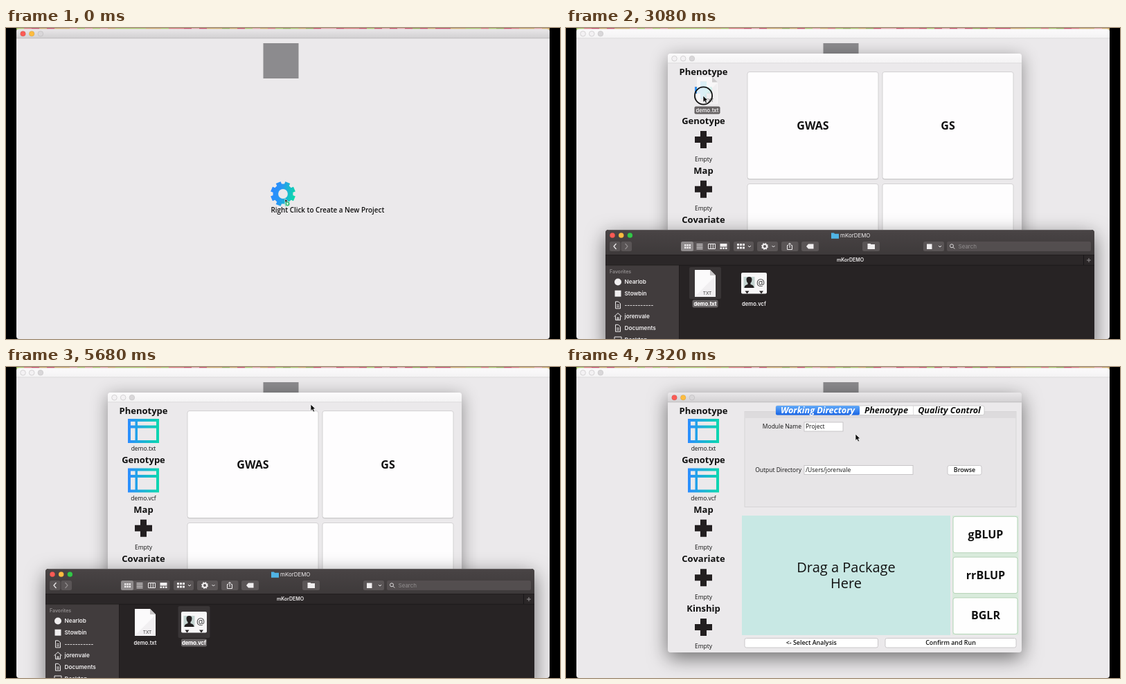
An HTML page that plays this animation: 800 px wide and 450 px high, repeating every 7.36 s.

```html
<!DOCTYPE html>
<html lang="en">
<head>
<meta charset="utf-8">
<title>Project setup demo</title>
<style>
html, body { margin: 0; width: 100%; height: 100%; overflow: hidden; background: #000; }
svg { display: block; width: 800px; height: 450px; }
text { font-family: "Open Sans", "Noto Sans", sans-serif; fill: #111; white-space: pre; }
.b { font-weight: 700; }
.m { font-weight: 600; }
.i { font-style: italic; }
.light { fill: #fff; }
.win { --bar: #fbfafb; --fall: .03; --line: #d4d2d4; --r: #f3f1f3; --y: #f3f1f3; --rim: #c6c4c6; }
.win.on { --bar: #e9e7e9; --fall: .1; --line: #b5b3b5; --r: #fb5b55; --y: #fdbc40; --rim: #0002; }
.shade { filter: drop-shadow(0 5px 12px #0006); }
.on > .shade { filter: drop-shadow(0 8px 14px #0008); }
.fin { --bar: #383434; --fall: .08; --tab: #302c2d; --side: #322f2f; --btn: #423e3f; --lit: #555152;
  --ink: #aaa7a8; --dim: #777475; --folder: #8d8a8b; --r: #4b4748; --y: #4b4748; --g: #4b4748; --rim: #777475; }
.fin.on { --bar: #494445; --fall: .16; --tab: #2b2728; --side: #413c3d; --btn: #5a5556; --lit: #8f8b8c;
  --ink: #f0eeef; --dim: #918d8e; --folder: #50b4e5; --r: #fb5b55; --y: #fdbc40; --g: #33c748; --rim: #0002; }
.bar { fill: var(--bar); }
.fall { fill: url(#fall); opacity: var(--fall); }
.fin text { font-family: Inter, Roboto, sans-serif; fill: var(--ink); }
.fin .dim { fill: var(--dim); }
.fin .file text, .drag text { font-family: Inter, Roboto, sans-serif; fill: #f5f3f4; }
.fin .file .ink, .drag .ink { fill: #444; }
.ln { fill: none; stroke: var(--ink); }
</style>
</head>
<body>
<svg id="stage" viewBox="0 0 800 450"></svg>
<script>
const LOOP = 7360, STEP = 40;
const BG = '#ebe9eb';

const rect = (x, y, w, h, fill, extra = '') =>
  `<rect x="${x}" y="${y}" width="${w}" height="${h}" fill="${fill}" ${extra}/>`;
const circle = (x, y, r, fill, extra = '') => `<circle cx="${x}" cy="${y}" r="${r}" fill="${fill}" ${extra}/>`;
const path = (d, extra) => `<path d="${d}" ${extra}/>`;
const group = (id, body, extra = '') => `<g id="${id}" ${extra}>${body}</g>`;
// y is the middle of the capitals
const text = (x, y, s, size, cls = '', anchor = 'middle') =>
  `<text x="${x}" y="${y + size * 0.35}" font-size="${size}" class="${cls}" text-anchor="${anchor}">${s}</text>`;

const dots = (x, y, last) => [['var(--r)', 0], ['var(--y)', 12.7], [last, 25.4]]
  .map(([c, dx]) => circle(x + dx, y, 3.8, c, 'stroke="var(--rim)" stroke-width=".7"')).join('');

// Bar with round top corners; a dark overlay deepens it towards the bottom
function bar(x, y, w, h) {
  const d = `M${x} ${y + h}V${y + 4}q0-4 4-4H${x + w - 4}q4 0 4 4V${y + h}Z`;
  return path(d, 'class="bar"') + path(d, 'class="fall"');
}
const titleBar = (x, y, w, h) => bar(x, y, w, h) + rect(x, y + h - 0.5, w, 0.7, 'var(--line)');

const defs = `<defs>
  <linearGradient id="tint"><stop stop-color="#2c8dff"/><stop offset="1" stop-color="#0bd8ae"/></linearGradient>
  <linearGradient id="gearTint" gradientUnits="userSpaceOnUse" x1="-16" y1="-4" x2="17" y2="4">
    <stop stop-color="#2b8bff"/><stop offset=".35" stop-color="#2795f5"/><stop offset="1" stop-color="#0cdca8"/></linearGradient>
  <linearGradient id="tab" x2="0" y2="1"><stop stop-color="#64abf8"/><stop offset="1" stop-color="#1764e6"/></linearGradient>
  <linearGradient id="fall" x2="0" y2="1"><stop stop-opacity="0"/><stop offset="1"/></linearGradient>
  <clipPath id="pane"><rect x="250" y="51" width="408" height="361"/></clipPath>
</defs>`;

function wallpaper() {
  const tones = ['#a9c56c', '#d7787c', '#c9a86a', '#c34f66', '#8fa655', '#e0a3a6'];
  let seed = 7, out = '';
  for (let x = 15; x < 785; x += 11) {
    seed = (seed * 73 + 41) % 997;
    out += rect(x, 0, 11, 3, tones[seed % tones.length]);
  }
  return out;
}

function gear() {
  let teeth = '';
  for (let k = 0; k < 8; k++) {
    const a = (k + 0.5) * Math.PI / 4, c = Math.cos(a), s = Math.sin(a);
    teeth += `M${c * 12} ${s * 12}L${c * 17.8} ${s * 17.8}`;
  }
  return circle(0, 0, 10.7, 'none', 'stroke="url(#gearTint)" stroke-width="7.6"') +
    path(teeth, 'stroke="url(#gearTint)" stroke-width="7.4"');
}

const mainWindow = group('main',
  rect(15, 1.5, 770, 448.5, BG, 'rx="4"') + titleBar(15, 1.5, 770, 13.5) +
  dots(24.5, 8.3, '#d9d7d9') +
  rect(371.5, 22, 51, 51, '#8c8b8e') +
  `<g transform="translate(400 240)">${gear()}</g>` +
  text(382.5, 264, 'Right Click to Create a New Project', 9.87, 'm', 'start'), 'class="win"');

const plus = (y, fill) => path(`M194 ${y - 12.5}h9v8h8v9h-8v8h-9v-8h-8v-9h8Z`, `fill="${fill}"`);
const tableIcon = y =>
  path(`M176 ${y - 17.5}h45v35h-45ZM180 ${y - 13.5}v5.5h6.5v-5.5ZM190 ${y - 13.5}v5.5h27v-5.5ZM180 ${y - 4}v17.5h6.5v-17.5ZM190 ${y - 4}v17.5h27v-17.5Z`,
    'fill="url(#tint)" fill-rule="evenodd"');

const slots = ['Phenotype', 'Genotype', 'Map', 'Covariate', 'Kinship'].map((name, k) => {
  const y = 63 + k * 71.6, file = ['demo.txt', 'demo.vcf'][k];
  let s = text(198.5, y, name, 13, 'b') +
    group('empty' + k, plus(y + 27, '#231f20') + text(198.5, y + 55, 'Empty', 8.5));
  if (file) {
    s += group('hover' + k, plus(y + 27, 'url(#tint)')) +
      group('full' + k, tableIcon(y + 29.5) + text(198.5, y + 55, file, 8.5));
  }
  return s;
}).join('');

const card = (x, y, w, h, label) =>
  rect(x, y + 0.8, w, h, '#b9b7b9', 'rx="3"') +
  rect(x, y, w, h, '#fefdfe', 'rx="3" stroke="#cbc9cb" stroke-width=".8"') +
  text(x + w / 2, y + h / 2, label, 16, 'b');
const button = (x, y, w, label) =>
  rect(x, y + 0.5, w, 13.5, '#fff', 'rx="2.5" stroke="#bfbdbf" stroke-width=".8"') +
  text(x + w / 2, y + 7, label, 8.9, 'm');
const field = (x, y, w, label, value) =>
  text(x - 4, y + 6.5, label, 8.5, '', 'end') +
  rect(x, y, w, 13, '#fff', 'stroke="#bdbbbd" stroke-width=".8"') +
  text(x + 2, y + 6.5, value, 8.5, '', 'start');
const tabLabel = (x, label, cls = '') => text(x, 62.5, label, 12.6, 'b i ' + cls);

const menu = card(262, 63.5, 189, 155, 'GWAS') + card(457, 63.5, 189, 155, 'GS') +
  rect(457, 63.5, 189, 155.5, 'none', 'id="focus" rx="3" stroke="#78aeea" stroke-width="2"') +
  card(262, 225.5, 189, 175, 'BSA') + card(457, 225.5, 189, 175, 'Converter');

const setup = `<g transform="translate(408 0)">` +
  rect(258, 64.5, 392, 138, '#e7e5e7', 'stroke="#d3d1d3" stroke-width=".8"') +
  rect(258, 65, 392, 9, '#dddbdd') +
  rect(303, 56, 301, 13.5, '#fff', 'rx="2.5" stroke="#c5c3c5" stroke-width=".8"') +
  rect(303, 56, 121, 13.5, 'url(#tab)', 'rx="2"') + rect(501, 56, 0.7, 13.5, '#d0ced0') +
  tabLabel(363.5, 'Working Directory', 'light') + tabLabel(462.5, 'Phenotype') + tabLabel(553.5, 'Quality Control') +
  field(344, 80, 56, 'Module Name', 'Project') +
  field(344, 142.5, 157, 'Output Directory', '/Users/jorenvale') +
  button(551, 142, 49, 'Browse') +
  rect(254, 215, 301, 173, '#c8e8e4') +
  text(404.5, 290, 'Drag a Package', 20) + text(404.5, 313, 'Here', 20) +
  rect(558, 215, 95.5, 172.5, '#d9ebdc') +
  ['gBLUP', 'rrBLUP', 'BGLR'].map((s, k) =>
    rect(559, 216.3 + k * 58.8, 93, 52.5, '#fefefe', 'rx="3" stroke="#b5d3b8" stroke-width="1"') +
    text(606, 242.5 + k * 58.6, s, 16, 'b')).join('') +
  button(258, 392, 192.5, '&lt;- Select Analysis') + button(461, 392, 189, 'Confirm and Run') + '</g>';

const project = group('project',
  rect(147, 37, 511, 376, BG, 'rx="4" class="shade"') +
  titleBar(147, 37, 511, 14) + dots(156.5, 44.2, '#d9d7d9') + slots +
  `<g clip-path="url(#pane)"><g id="slide">${menu}${setup}</g></g>`, 'class="win"');

// File icons are centred on the origin
const page = path('M-15-19.5H7L15-11.5V19.5H-15Z', 'fill="#fbfafb"') +
  path('M7-19.5V-11.5H15Z', 'fill="#c9c7c8"') + path('M-14 18L14-10V19H-14Z', 'fill="#f1eff1"') +
  text(3, 14.5, 'TXT', 6.6, 'ink');
const contact = rect(-18.5, -15.5, 37, 30.5, '#f7f6f7', 'rx="2"') +
  rect(-15, -9.5, 16, 16, '#c4d4d1') +
  path('M-14 6.5q0-4 5-5v-2q-2-2-2-5a4 4 0 0 1 8 0q0 3-2 5v2q5 1 5 5Z', 'fill="#231f20"') +
  text(9.5, -1.5, '@', 12.5, 'ink') +
  path('M-13 11h6l-3 4ZM7.5 11h6l-3 4Z', 'fill="#231f20"');
const pill = (y, label) => rect(-18.5, y - 5.5, 37, 11, '#666263', 'rx="2"') + text(0, y, label, 7.6, 'm');
const file = (id, x, icon, label) => `<g class="file" transform="translate(${x} 369.5)">` +
  group(id, rect(-23, -23.5, 46, 46, '#393536', 'rx="2"') + pill(29.5, label)) +
  icon + text(0, 29.5, label, 7.6, 'm') + '</g>';

const btn = (x, w) => rect(x, 309, w, 14, 'var(--btn)', 'rx="2.5"');
const line = (d, w = 1) => path(d, `class="ln" stroke-width="${w}"`);
const ink = d => path(d, 'fill="var(--ink)"');
const caret = x => line(`M${x} 315l2 2 2-2`);

function toolbar() {
  let s = btn(63, 15.5) + btn(79.5, 15.5) + line('M72.5 312l-3.5 4 3.5 4', 1.2) +
    path('M85.5 312l3.5 4-3.5 4', 'fill="none" stroke="var(--dim)" stroke-width="1.2"');
  s += btn(166, 70.5) + rect(166, 309, 18, 14, 'var(--lit)', 'rx="2.5"');
  for (let k = 0; k < 6; k++) s += rect(171 + (k % 3) * 3.3, 313 + (k > 2) * 3.6, 2.4, 2.5, 'var(--ink)');
  for (let k = 0; k < 4; k++) s += rect(188.5, 312.3 + k * 2.3, 9, 1, 'var(--ink)');
  s += line('M205.5 312.5h10v7h-10ZM209 312.5v7M212.3 312.5v7') +
    ink('M222.5 312h10v4.5h-10ZM222.5 317.5h2.6v2.5h-2.6ZM226.2 317.5h2.6v2.5h-2.6ZM229.9 317.5h2.6v2.5h-2.6Z');
  s += btn(242, 29) + ink('M247 312h3v3h-3ZM251 312h3v3h-3ZM255 312h3v3h-3ZM247 316.5h3v3h-3ZM251 316.5h3v3h-3ZM255 316.5h3v3h-3Z') + caret(263);
  s += btn(276, 30) + circle(287, 316, 3, 'none', 'class="ln" stroke-width="2"') +
    circle(287, 316, 4.3, 'none', 'class="ln" stroke-width="1.4" stroke-dasharray="1.7 1.68"') + caret(297.5);
  s += btn(311, 24.5) + line('M321 314.5h-1.5v6h7v-6h-1.5M323 318v-6.5M321 313.3l2-2 2 2');
  s += btn(340, 25) + ink('M347 316l3-3.5h7.5v7h-7.5Z');
  s += btn(428, 25) + ink('M435.5 312h4l1 1h5.5v7h-10.5Z') + btn(516, 30) +
    rect(521, 312.5, 7.5, 7.5, 'var(--ink)') + caret(538);
  s += rect(550, 309, 208, 14, 'var(--btn)', 'rx="2.5" opacity=".72"') +
    circle(557, 315.3, 2.5, 'none', 'class="ln" stroke-width=".9"') + line('M559 317.3l2.2 2.2') +
    text(566.5, 316, 'Search', 8, 'dim', 'start');
  return s;
}

function sidebar() {
  const sheet = y => line(`M71.5 ${y - 5}h4l3 3v7h-7ZM73 ${y}h4M73 ${y + 2.5}h4`);
  const rows = [
    ['Nearlob', y => circle(75, y, 5, 'var(--ink)')],
    ['Stowbin', y => rect(70.5, y - 4.5, 9, 9, 'var(--ink)')],
    ['-----------', sheet],
    ['jorenvale', y => line(`M69.5 ${y}l5.5-5 5.5 5M71.5 ${y - 1}v6h7v-6M74 ${y + 5}v-3.5h2v3.5`)],
    ['Documents', sheet],
    ['Desktop', y => line(`M70 ${y - 4}h10v7h-10Z`)],
  ];
  return text(63, 353, 'Favorites', 7, 'm dim', 'start') + rows.map(([name, icon], k) => {
    const y = 367.5 + k * 16.7;
    return icon(y) + text(84.5, y, name, 8.2, 'm', 'start');
  }).join('');
}

const finder = group('finder',
  path('M57 460V297q0-5 5-5H758q5 0 5 5V460Z', 'fill="#272324" class="shade"') +
  bar(57, 292, 706, 36.5) +
  rect(61, 292, 698, 0.7, '#6b6768') +
  rect(57, 328.5, 706, 14.5, 'var(--tab)') + rect(57, 328, 706, 0.7, '#1b1819') + rect(57, 342.8, 706, 0.7, '#191617') +
  rect(747, 328.5, 0.8, 14.5, '#151213') + path('M752 336h6M755 333v6', 'stroke="var(--dim)"') +
  rect(57, 343.5, 106, 107, 'var(--side)') + rect(163, 343.5, 0.7, 107, '#1d1a1b') +
  dots(67, 300, 'var(--g)') +
  path('M383 296.5h4l1 1.2h6v7h-11Z', 'fill="var(--folder)"') +
  text(396, 300.5, 'mKorDEMO', 7.9, '', 'start') + text(410.5, 336, 'mKorDEMO', 7, 'm') +
  toolbar() + sidebar() +
  file('selTxt', 201, page, 'demo.txt') + file('selVcf', 271.5, contact, 'demo.vcf'), 'class="fin"');

const drags = group('dragTxt', `<g opacity=".86">${page}</g>` + pill(29, 'demo.txt'), 'class="drag"') +
  group('dragVcf', `<g opacity=".8">${contact}</g>` + pill(29, 'demo.vcf'), 'class="drag"');

const pointer = group('pointer',
  circle(0.5, 0, 12.6, 'none', 'id="ring" stroke="#111" stroke-width="1.8"') +
  path('M0 0V9.5L2.2 7.5 3.8 11 5.6 10.2 4 6.8H7Z', 'fill="#0a0a0a" stroke="#fff" stroke-width=".7"') +
  group('badge', circle(3.5, 7.3, 3.4, '#27b36a', 'stroke="#e8fff2" stroke-width=".6"') +
    path('M1.7 7.3h3.6M3.5 5.5v3.6', 'stroke="#fff" stroke-width="1"')));

document.getElementById('stage').innerHTML = defs + wallpaper() + mainWindow + project + finder + drags + pointer +
  rect(0, 0, 14.7, 450, '#000') + rect(785.3, 0, 15, 450, '#000');

const el = id => document.getElementById(id);
const show = (id, on) => { el(id).style.display = on ? '' : 'none'; };
const move = (id, x, y) => el(id).setAttribute('transform', `translate(${x.toFixed(2)} ${y.toFixed(2)})`);

// Pointer stops: time, x, y
const route = [
  [0, 403, 247], [720, 403, 247], [1280, 372, 462], [1680, 300, 462],
  [2160, 195, 378], [2320, 195, 378], [2960, 198, 98], [3240, 198, 98],
  [3640, 273, 371], [3840, 273, 371], [4480, 202, 151], [4760, 202, 151],
  [5600, 440, 57], [5680, 440, 54], [5880, 440, 46], [6000, 440, 46],
  [6280, 568, 115], [6760, 568, 115], [7280, 418, 97], [LOOP, 418, 97],
];

function pointerAt(t) {
  const k = route.findIndex(p => p[0] > t);
  const [t0, x0, y0] = route[k - 1], [t1, x1, y1] = route[k];
  const u = (t - t0) / (t1 - t0), e = u * u * (3 - 2 * u);
  return [x0 + (x1 - x0) * e, y0 + (y1 - y0) * e];
}

function draw(t) {
  const within = (a, b) => t >= a && t < b;
  const [x, y] = pointerAt(t);
  const dragTxt = within(2240, 3200), dragVcf = within(3720, 4720);
  const full = [t >= 3200, t >= 4720];
  const over = [dragTxt && y < 112, dragVcf && y < 180];

  show('project', t >= 720);
  show('finder', within(1360, 5880));
  el('main').classList.toggle('on', t < 720);
  el('project').classList.toggle('on', within(720, 1360) || t >= 5880);
  el('finder').classList.toggle('on', t >= 2160);

  show('selTxt', within(2200, 3680));
  show('selVcf', !within(2200, 3680));
  for (const k of [0, 1]) {
    show('full' + k, full[k]);
    show('empty' + k, !full[k]);
    show('hover' + k, over[k]);
  }

  show('dragTxt', dragTxt);
  show('dragVcf', dragVcf);
  move('dragTxt', x + 6, y - 8);
  move('dragVcf', x - 1.5, y - 4);

  const slide = Math.min(1, Math.max(0, (t - 6400) / 378));
  move('slide', -408 * slide, 0);
  show('focus', t >= 6360);

  move('pointer', x, y);
  show('ring', dragTxt || dragVcf || within(600, 720) || within(5880, 5960) || within(6320, 6400));
  show('badge', t < 240);
}

function tick() {
  const t = performance.now() % LOOP;
  draw(Math.floor(t / STEP) * STEP);
  requestAnimationFrame(tick);
}
tick();
</script>
</body>
</html>
```
